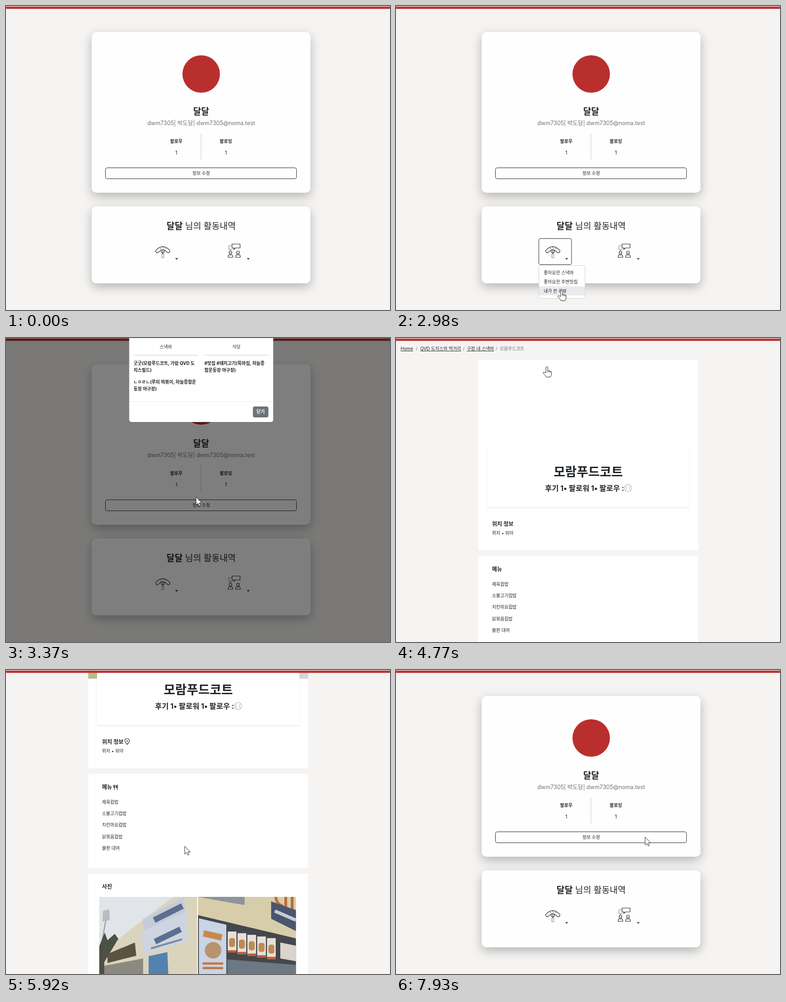
An HTML page that plays this animation: 840 px wide and 666 px high, repeating every 8 s.

```html
<!DOCTYPE html>
<html lang="ko">
<head>
<meta charset="utf-8">
<style>
html, body { margin: 0; width: 100%; height: 100%; overflow: hidden; background: #f5f4f2; }
svg { display: block; width: 840px; height: 666px; fill: #212529; font-family: Inter, "Noto Sans CJK KR", sans-serif; }
text { white-space: pre; }
.card { fill: #fefefe; filter: drop-shadow(0 8px 11px rgba(0, 0, 0, .26)); }
.line { fill: none; stroke: #24282c; stroke-width: 1.2; stroke-linecap: round; stroke-linejoin: round; }
.soft { fill: none; stroke: #8b8e94; stroke-width: 1.2; }
</style>
</head>
<body>
<svg viewBox="0 0 840 666" id="stage"></svg>
<script>
// y is the visual middle of the line
const text = (x, y, size, str, attrs = '') =>
  `<text x="${x}" y="${y + size * .37}" font-size="${size}" ${attrs}>${str}</text>`;
const S = 9.75, MID = 'text-anchor="middle"', BOLD = 'font-weight="700"';
const label = (x, y, str, attrs) => text(x, y, S, str, attrs);
const rect = (x, y, w, h, attrs = '') => `<rect x="${x}" y="${y}" width="${w}" height="${h}" ${attrs}/>`;
const poly = (points, fill) => `<polygon points="${points}" fill="${fill}"/>`;
const path = (d, attrs) => `<path d="${d}" ${attrs}/>`;
const group = (id, body, attrs = '') => `<g id="${id}" ${attrs}>${body}</g>`;

const person = x => `<circle cx="${x}" cy="540" r="3" class="line"/>` +
  path(`M${x - 5} 550.5v-1.5q0-4 3.5-4.3l1.5 1.2 1.5-1.2q3.5.3 3.5 4.3v1.5z`, 'class="line"');

const snackIcon =
  group('fork', path('M339.5 533v4.5q0 3.5 3.5 3.5t3.5-3.5V533M343 533v9.5', 'class="line"') +
    rect(341, 543.5, 4, 8, 'class="soft"')) +
  path('', 'id="skin" class="line" style="stroke-width:8"') +
  path('', 'id="meat" class="line" style="stroke-width:5.6;stroke:#fefefe"') +
  path('', 'id="cuts" class="line" style="stroke-width:1"');

const menu =
  rect(312.5, 568.5, 101, 72, 'rx="3.5" fill="#fff" stroke="#cfd0d2"') +
  rect(313, 594, 100, 20, 'id="row" fill="#e9ebee"') +
  ['좋아요한 스낵바', '좋아요한 주변맛집', '내가 쓴 리뷰'].map((s, i) => label(323, 584 + i * 20.2, s)).join('');

const profile =
  rect(187.5, 57, 478.5, 352, 'rx="10" class="card"') +
  rect(187.5, 439, 478.5, 168.5, 'rx="10" class="card"') +
  '<circle cx="427" cy="149" r="41" fill="#b92f2e"/>' +
  text(427, 231, 19, '달달', MID + BOLD) +
  text(427, 256, 12.4, 'dwm7305| 박도담| dwm7305@noma.test', MID + ' fill="#6c757d"') +
  label(372.5, 296, '팔로우', MID + BOLD) + label(372.5, 321, '1', MID + ' font-weight="500"') +
  label(481, 296, '팔로잉', MID + BOLD) + label(481, 321, '1', MID + ' font-weight="500"') +
  rect(426, 279, 1, 57, 'fill="#c8c9cb"') +
  rect(217.5, 354.5, 418, 24, 'rx="4" fill="none" stroke="#212529"') +
  label(427, 366.5, '정보 수정', MID) +
  text(427, 482, 19.1, `<tspan ${BOLD}>달달</tspan> 님의 활동내역`, MID) +
  rect(312.5, 509.5, 71.5, 57, 'id="frame" rx="3.5" fill="none" stroke="#212529"') +
  snackIcon +
  path('M494 525h-6.5v8h3v3l3-3h4.5v-2', 'class="soft"') +
  path('M494.5 521.5h17.5v8.5h-10l-3 3v-3h-4.5z', 'class="line"') +
  person(491) + person(507.5) +
  path('M370 552.5h6.5l-3.25 3.3z', '') + path('M526.7 552.5h6.5l-3.25 3.3z', '') +
  group('menu', menu);

const modal =
  rect(269.5, -42, 315, 226, 'rx="5" fill="#fff"') +
  rect(270, 0, 314, 1, 'fill="#dee2e6"') +
  label(349.5, 19, '스낵바', MID) + label(504, 19, '식당', MID) +
  rect(279, 36.7, 141, 1.6, 'fill="#dcdde0"') + rect(434, 36.7, 140, 1.6, 'fill="#dcdde0"') +
  label(279, 55, '굿굿(모람푸드코트, 가람 QVD 도', BOLD) + label(279, 70, '치스필드)', BOLD) +
  label(279, 96, 'ㄴㅇㄹㄴ(루미 떡볶이, 하늘종합운', BOLD) + label(279, 111, '동장 야구장)', BOLD) +
  label(434, 55, '#맛집 #돼지고기(뚝마집, 하늘종', BOLD) + label(434, 70, '합운동장 야구장)', BOLD) +
  rect(270, 139, 314, 1, 'fill="#e6e8eb"') +
  rect(540, 150, 34, 24, 'rx="4" fill="#6c757d"') +
  label(557, 161.5, '닫기', MID + BOLD + ' fill="#fff"');

const storePhoto =
  rect(204, 497, 214, 285, 'fill="#e1e4e9"') +
  path('M219 545L208 605', 'stroke="#8d9299" stroke-width="2"') +
  poly('212,528 226,524 227,548 211,551', '#b9bcc0') +
  poly('204,605 216,575 222,592 238,578 250,595 250,666 204,700', '#4c5145') +
  poly('418,497 366,497 245,590 215,640 215,782 418,782', '#dad4bd') +
  poly('299,546 389,497 393,530 303,571', '#c5ccd7') +
  poly('297,572 395,529 400,592 300,624', '#ced5e0') +
  path('M324 548L386 517M326 595L382 568', 'stroke="#5d6f8f" stroke-width="13"') +
  path('M317 610L385 590', 'stroke="#7c8aa3" stroke-width="4"') +
  poly('222,622 282,597 285,626 222,642', '#5b5341') +
  poly('312,627 353,618 356,690 312,700', '#5283b0') +
  poly('215,648 300,632 300,782 215,782', '#8c8a80');

const posters = [0, 1, 2, 3, 4].map(i => {
  const x = 485 + i * 21.5, y = 573 + i * 3.6;
  return rect(x, y, 19, 46, 'fill="#e6e1d8"') + rect(x + 3, y + 14, 13, 20, 'rx="5" fill="#c08a52"') +
    rect(x, y + 41, 19, 5, 'fill="#bd5d3a"');
}).join('');

const counterPhoto =
  rect(420, 497, 214.5, 285, 'fill="#d8cdaa"') +
  poly('420,497 522,497 522,515 470,506', '#8f949b') +
  path('M590 497q2 17 16 20M612 497v25M626 497v28', 'stroke="#bf6c3b" stroke-width="6" fill="none"') +
  poly('580,507 634.5,526 634.5,572 580,545', '#4a5670') +
  path('M588 528L634 548', 'stroke="#c6ccd6" stroke-width="7"') +
  poly('420,537 634.5,588 634.5,782 420,782', '#44474c') +
  poly('484,634 634.5,646 634.5,782 484,782', '#6c7882') +
  poly('422,544 482,558 482,680 422,680', '#c9d4e5') +
  '<circle cx="453" cy="614" r="18" fill="#b6946f"/>' +
  path('M432 577L472 586', 'stroke="#c58a48" stroke-width="14"') +
  path('M430 643h45M430 653h45', 'stroke="#c07a45" stroke-width="5"') +
  posters + poly('600,597 634.5,604 634.5,638 600,632', '#d9d5cd');

const crumbs =
  label(10, 23.5, 'Home', 'text-decoration="underline"') +
  label(53, 23.5, 'QVD 도치스의 먹거리', 'text-decoration="underline"') +
  label(155, 23.5, '구장 내 스낵바', 'text-decoration="underline"') +
  [43.5, 146.5, 218].map(x => label(x, 23.5, '/', 'fill="#6c757d"')).join('') +
  label(227, 23.5, '모람푸드코트', 'fill="#6c757d"');

const detail = crumbs +
  rect(180, 48, 481, 417.5, 'fill="#fff"') +
  rect(180, 478, 481, 205.5, 'fill="#fff"') +
  rect(180, 696, 481, 354, 'fill="#fff"') +
  rect(180, 48, 481, 221, 'id="hero" fill="url(#heroFill)"') +
  rect(199, 242, 443, 129, 'fill="#fff" style="filter:drop-shadow(0 1px 1.3px rgba(0,0,0,.13))"') +
  text(420.5, 293, 27.4, '모람푸드코트', MID + BOLD) +
  text(326, 329, 16.2, '후기 1• 팔로워 1• 팔로우 :', BOLD) +
  '<circle cx="507.5" cy="329" r="8" fill="none" stroke="#a9a49b"/>' +
  path('M502 323q4.5 6 0 12M513 323q-4.5 6 0 12', 'fill="none" stroke="#a9a49b"') +
  text(210, 407.5, 12, '위치 정보', BOLD) + label(210, 427, '위치 • 외야') +
  text(210, 507, 12, '메뉴', BOLD) +
  ['제육컵밥', '소불고기컵밥', '치킨마요컵밥', '닭볶음컵밥', '불판 대여']
    .map((s, i) => label(210, 539 + i * 25.3, s)).join('') +
  text(210, 725, 12, '사진', BOLD) +
  group('icons',
    path('M265 413q-5-5.5-5-8a5 5 0 0 1 10 0q0 2.500-5 8z', 'class="line"') +
    '<circle cx="265" cy="405.500" r="1.3"/>' +
    path('M235 502v3q0 2 2 2t2-2v-3M237 502v10.500', 'class="line"') +
    path('M243.500 512.500v-11q-2.500 2-2 6.500h2', 'class="line" style="fill:#212529"')) +
  group('photos', storePhoto + counterPhoto, 'transform="translate(0 250)" clip-path="url(#photoClip)"');

const stage = document.getElementById('stage');
stage.innerHTML =
  `<defs>
    <linearGradient id="heroFill"><stop stop-color="#b8bb88"/><stop offset=".5" stop-color="#d3d2bd"/><stop offset="1" stop-color="#cfd6e1"/></linearGradient>
    <clipPath id="photoClip">${rect(204, 497, 430.5, 285)}</clipPath>
  </defs>` +
  rect(0, 0, 840, 666, 'fill="#f5f4f2"') +
  group('profile', profile) + group('detail', detail) +
  rect(0, 0, 840, 1.3, 'fill="#f5f4f2"') + rect(0, 1.3, 840, 5, 'fill="#be2e30"') +
  rect(0, 0, 840, 666, 'id="shade" fill="#000"') + group('modal', modal) +
  group('cursor',
    path('M0 0V17.500L4 13.800 6.600 19.600 9.300 18.400 6.800 12.700H12.300z', 'id="arrow"') +
    group('hand', path('M-2 13.500V2a2 2 0 0 1 4 0v6.500q2-1.200 3 .600 2-.800 2.800 1 2.200-.400 2.200 1.600v4.300q0 3.500-2.200 6.600H-1.200q-1-3-4.400-6-2.800-2.600-2.400-4 .800-2 3-.400z', '') +
      path('M2 8.500v4M5 9.100v3.500M7.800 10.100v3', 'fill="none"')),
    'fill="#fff" stroke="#222" stroke-width="1"');

const el = {};
stage.querySelectorAll('[id]').forEach(n => el[n.id] = n);
const set = (id, name, value) => el[id].setAttribute(name, value);
const show = (id, on) => el[id].style.display = on ? '' : 'none';
const clamp = x => Math.max(0, Math.min(1, x));
const ramp = (t, a, b) => clamp((t - a) / (b - a));
const smooth = x => x * x * (3 - 2 * x);
const within = (t, a, b) => t >= a && t < b;

// [time, x, y] of the pointer tip
const track = [
  [210, 466, 660], [700, 352, 545], [1060, 352, 547], [1500, 356, 585], [1840, 363, 606],
  [2300, 362, 633], [2680, 362, 625], [2830, 362, 623], [3140, 362, 623], [3370, 416, 349],
  [3750, 360, 150], [4210, 333, 64], [4380, 333, 64], [4450, 330, 63], [4840, 330, 63],
  [5230, 391, 386], [6180, 391, 386], [6530, 66, 0], [7740, 127, 0], [7930, 545, 366], [8000, 545, 366]
];
const scrolls = [[0, 0], [5300, 0], [5920, 250], [6300, 425], [8000, 425]];

function at(keys, t) {
  const i = Math.max(1, keys.findIndex(k => k[0] > t));
  const a = keys[i - 1], b = keys[i], p = ramp(t, a[0], b[0]);
  return a.slice(1).map((v, j) => v + (b[j + 1] - v) * p);
}

function drawSnack(t) {
  const p = smooth(ramp(t, 960, 1450)) * (1 - smooth(ramp(t, 2050, 2650)));
  const end = 537 - 15.200 * p, bend = 524 - 2.200 * p;
  const curve = `M331 ${end}Q343 ${bend} 355 ${end}`;
  set('skin', 'd', curve);
  set('meat', 'd', curve);
  set('cuts', 'd', [.25, .5, .75].map(u => {
    const y = end + 2 * u * (1 - u) * (bend - end);
    return `M${331 + 24 * u} ${y - 2}l1.500 2`;
  }).join(''));
  set('fork', 'transform', `translate(0 ${3 * p})`);
}

function draw(t) {
  const onDetail = within(t, 4770, 7460);
  show('profile', !onDetail);
  show('detail', onDetail);
  set('detail', 'transform', `translate(0 ${-Math.round(at(scrolls, t)[0])})`);
  show('hero', t >= 5000);
  show('icons', t >= 5000);

  const [x, y] = at(track, t);
  const hand = within(t, 600, 3010) || within(t, 4050, 4840);
  show('cursor', within(t, 210, 6500) || t >= 7750);
  set('cursor', 'transform', `translate(${x} ${y})`);
  show('hand', hand);
  show('arrow', !hand);

  drawSnack(t);
  set('frame', 'opacity', t < 900 ? 0 : 1 - ramp(t, 3000, 3155));
  show('menu', within(t, 940, 3000));
  const row = Math.floor((y - 574) / 20);
  show('row', row >= 0 && row < 3);
  set('row', 'y', 574 + row * 20);

  const open = within(t, 3000, 4770);
  show('shade', open);
  set('shade', 'opacity', .5 * ramp(t, 3023, 3173));
  show('modal', open);
  set('modal', 'opacity', ramp(t, 3190, 3340));
  set('modal', 'transform', `translate(0 ${5 - 31 * (1 - ramp(t, 3190, 3490)) ** 2})`);
}

function tick() {
  draw(performance.now() % 8000);
  requestAnimationFrame(tick);
}
tick();
</script>
</body>
</html>
```
